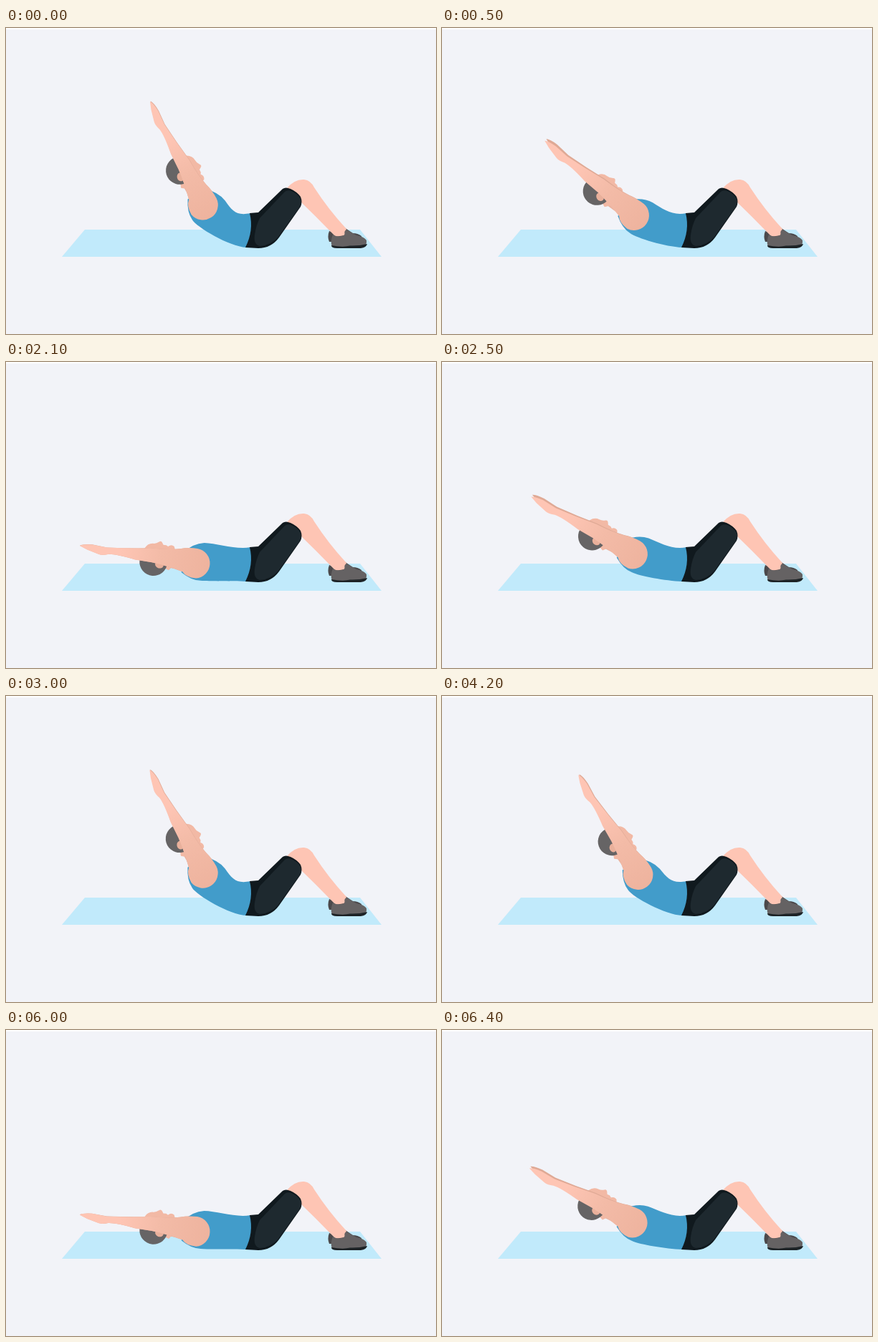
An HTML page with a canvas that plays this animation: 600 by 428 pixels, repeating every 6500 ms.

```html
<!DOCTYPE html>
<html lang="en">
<head>
<meta charset="utf-8">
<title>Crunch exercise</title>
<style>
html, body { margin: 0; width: 100%; height: 100%; overflow: hidden; background: #f2f3f8; }
canvas { display: block; width: 600px; height: 428px; }
</style>
</head>
<body>
<canvas id="stage" width="600" height="428"></canvas>
<script>
const ctx = document.getElementById('stage').getContext('2d');
const LOOP = 6500, STEP = 100, RAD = Math.PI / 180;
const SKIN = '#fec5b4', SHADE = '#eab4a0';

// Each move starts from the end of the one before it
const MOVES = [
  { start: -322, length: 1724, up: false },
  { start: 1980, length: 1260, up: true },
  { start: 3825, length: 1500, up: false },
  { start: 5900, length: 1265, up: true }
];

const armPath = new Path2D(
  'M163 -1Q159 -4 146 -5L125 -4Q95 -7 65 -12Q40 -13 24 -17Q12 -21 0 -21' +
  'A21 21 0 0 0 -4 20.5Q10 21 16 14Q40 9 60 7.5L84 7Q112 3 122 5Q130 8 135 7' +
  'L152 3Z');
const facePath = new Path2D(
  'M0 -19L14 -18Q22 -16 24 -9Q25 -5 29 -2Q32 0 29 3L27 5L28 9L27 12' +
  'Q32 15 30 20Q24 25 10 30L-4 24Z');
const matPath = new Path2D('M110 282H494L524 320H78Z');
const legPath = new Path2D(
  'M392 224Q403 211 416 212Q425 213 430 223Q450 254 475 281L472 290L460 292' +
  'Q433 264 405 237Z');
const shortsPath = new Path2D(
  'M340 259L352 258L386 225Q390 222 397 225Q406 229 411 236Q414 243 411 250' +
  'L381 293Q370 308 352 308L334 307Q346 283 340 259Z');
const thighPath = new Path2D(
  'M354 266L389 229Q394 225 402 230Q410 235 412 242L410 250L380 292' +
  'Q370 304 354 305Q345 303 347 289Q349 276 354 266Z');
const backShoe = new Path2D(
  'M451 284Q448 292 451 299H492Q498 296 496 291Q491 287 484 287L472 279' +
  'Q470 287 462 288Z');
const frontShoe = new Path2D(
  'M456 289Q452 298 455 306H498Q504 304 503 297Q500 292 489 290L475 282' +
  'Q471 284 473 289Q465 294 456 289Z');
const solePath = new Path2D(
  'M454 304Q470 307 480 304.5Q492 305 504 302Q503 307 495 308H462Q454 308 454 304Z');

// 0 is lying down, 1 is fully raised
function liftAt(time) {
  const move = MOVES.findLast(m => time >= m.start);
  const u = Math.min(1, (time - move.start) / move.length);
  const wave = Math.cos(Math.PI * u) / 2;
  return move.up ? .5 - wave : .5 + wave;
}

function fill(path, color) {
  ctx.fillStyle = color;
  ctx.fill(path);
}

function ellipse(x, y, rx, ry, color) {
  ctx.fillStyle = color;
  ctx.beginPath();
  ctx.ellipse(x, y, rx, ry, 0, 0, Math.PI * 2);
  ctx.fill();
}

// Chest and back turn rigidly about the shoulder; the waist stays put
function drawTorso([sx, sy], turn) {
  const c = Math.cos(turn), s = Math.sin(turn);
  const at = (x, y) => [sx + x * c - y * s, sy + x * s + y * c];
  ctx.fillStyle = '#429cca';
  ctx.beginPath();
  ctx.moveTo(...at(-18, -14));
  ctx.quadraticCurveTo(...at(-4, -28), ...at(12, -29));
  ctx.bezierCurveTo(...at(30, -29), 322, 263, 341, 259);
  ctx.quadraticCurveTo(346, 283, 335, 307);
  ctx.bezierCurveTo(312, 306, ...at(20, 25), ...at(8, 24));
  ctx.quadraticCurveTo(...at(-5, 24), ...at(-19, 13));
  ctx.fill();
}

function drawHead(x, y, tilt, shoulder) {
  const c = Math.cos(tilt), s = Math.sin(tilt);
  ctx.strokeStyle = SHADE;
  ctx.lineWidth = 22;
  ctx.beginPath();
  ctx.moveTo(x + 9 * c + 16 * s, y - 9 * s + 16 * c);
  ctx.lineTo(...shoulder);
  ctx.stroke();

  ctx.save();
  ctx.translate(x, y);
  ctx.rotate(-tilt);
  fill(facePath, '#f2b9a5');
  ctx.fillStyle = '#666465';
  ctx.beginPath();
  ctx.arc(0, 0, 19.5, Math.PI * .42, Math.PI * 1.72);
  ctx.lineTo(8, 2);
  ctx.fill();
  ellipse(-1, 9, 5, 6, '#e9b09b');
  ctx.restore();
}

function drawArm([x, y], angle, color) {
  ctx.save();
  ctx.translate(x, y);
  ctx.rotate(Math.PI + angle);
  ctx.scale(1, -1);
  fill(armPath, color);
  ctx.restore();
}

const armTone = ctx.createLinearGradient(-20, 0, 105, 0);
armTone.addColorStop(0, '#eeb39e');
armTone.addColorStop(.55, '#f3bba7');
armTone.addColorStop(1, SKIN);

function draw(time) {
  const k = liftAt(time), k2 = k * k;
  const shoulder = [264 + 2.5 * k + 10.4 * k2, 282.5 - 37.7 * k];
  const angle = (7 + 60.7 * k) * RAD;
  const tilt = (72 - 75 * k + 12 * k2) * RAD;

  ctx.fillStyle = '#f2f3f8';
  ctx.fillRect(0, 0, 600, 428);
  ctx.fillStyle = '#fff';
  ctx.fillRect(0, 0, 600, 2);
  fill(matPath, '#c1eafb');

  fill(backShoe, '#4b494b');
  fill(legPath, SKIN);
  fill(frontShoe, '#656263');
  fill(solePath, '#1d2326');

  drawHead(206 - 10.5 * k + 55 * k2, 282 - 114 * k + 26 * k2, tilt, shoulder);
  drawArm(shoulder, angle + 1.2 * RAD * Math.sin(Math.PI * k), '#dfa995');
  drawTorso(shoulder, 60.7 * k * RAD);
  fill(shortsPath, '#10191e');
  fill(thighPath, '#1e292f');
  drawArm(shoulder, angle, armTone);
}

const start = performance.now();
function tick() {
  const time = (performance.now() - start) % LOOP;
  draw(Math.floor(time / STEP) * STEP);
  requestAnimationFrame(tick);
}
tick();
</script>
</body>
</html>
```
